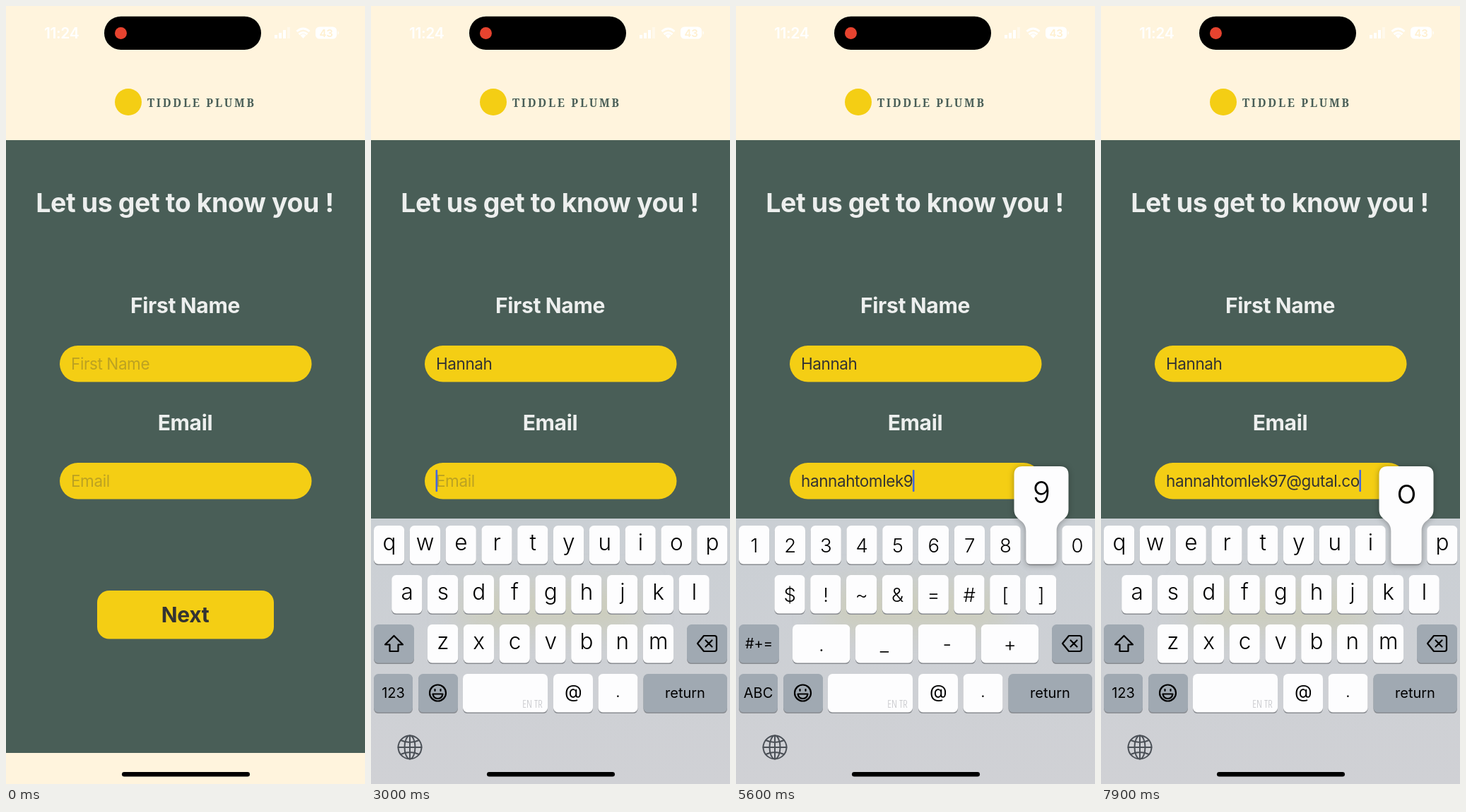
An HTML page for the animation above (8000 ms loop, 508 by 1102 pixels).

```html
<!DOCTYPE html>
<html lang="en">
<head>
<meta charset="utf-8">
<title>Sign-up form</title>
<style>
  html, body { margin: 0; height: 100%; overflow: hidden; background: #fff4dd; }
  svg { display: block; }
  #stage { width: 100vw; height: 100vh; }
  text { font-family: Inter, "Open Sans", sans-serif; letter-spacing: -.018em; }
  .mid { text-anchor: middle; }
  .bold { font-weight: 700; fill: #edefee; letter-spacing: -.011em; }
  .input { font-size: 22.5px; fill: #333; }
  .hint { font-size: 22.5px; fill: #3c3c43; fill-opacity: .3; }
  .lower { font-size: 31.5px; font-weight: 300; }
  .upper { font-size: 27.5px; font-weight: 350; }
  .small { font-size: 20px; letter-spacing: 0; }
  .at { font-size: 25.5px; }
  .lang { font: 300 15px "Open Sans", sans-serif; font-stretch: 75%; letter-spacing: 0; fill: #bbbcc0; text-anchor: end; }
  .line { fill: none; stroke: #000; stroke-width: 2.2; stroke-linecap: round; stroke-linejoin: round; }
  .gray { stroke: #4b5057; stroke-width: 2; }
  #popup { filter: drop-shadow(0 1px 4px #0005); }
  #popup text { font-weight: 300; }
</style>
</head>
<body>
<svg id="stage" viewBox="0 0 508 1102">
  <defs>
    <linearGradient id="board" x2="0" y2="1">
      <stop stop-color="#cacfd4"/><stop offset="1" stop-color="#d0d1d5"/>
    </linearGradient>
    <filter id="soft" x="-50%" y="-150%" width="200%" height="400%"><feGaussianBlur stdDeviation="24"/></filter>
  </defs>

  <rect width="508" height="1102" fill="#fff4dd"/>
  <rect y="190" width="508" height="868" fill="#495e57"/>

  <g fill="#fff">
    <text x="54" y="45.5" font-size="21" font-weight="600">11:24</text>
    <path d="M380 41h4v5h-4zM386 38h4v8h-4zM392 34h4v12h-4z"/>
    <path d="M398 30h4v16h-4z" opacity=".4"/>
    <path d="M420.5 46l-4-4.5q4-3.5 8 0z"/>
    <path d="M411.5 36q9-8 18 0M414.5 40q6-5 12 0" fill="none" stroke="#fff" stroke-width="3"/>
    <rect x="438" y="29.5" width="30" height="17" rx="5.5"/>
    <path d="M469.5 35q2.5 3 0 6z"/>
    <text class="mid" x="453" y="43.5" font-size="15" font-weight="600" fill="#fff0d0">43</text>
  </g>
  <rect x="139" y="14.7" width="222" height="47.3" rx="23.6"/>
  <circle cx="162.5" cy="38.5" r="8.5" fill="#e6432f"/>

  <circle cx="173" cy="136" r="19" fill="#f4ce14"/>
  <text x="200" y="143" style="font:700 15.5px 'Noto Serif',serif;letter-spacing:2.7px" fill="#495e57">TIDDLE PLUMB</text>

  <text class="mid bold" x="253" y="292" font-size="37.5">Let us get to know you !</text>
  <text class="mid bold" x="253.5" y="435" font-size="30">First Name</text>
  <text class="mid bold" x="253.5" y="601" font-size="30">Email</text>
  <g fill="#f4ce14">
    <rect x="76" y="481" width="356.5" height="51.5" rx="25.75"/>
    <rect x="76" y="647" width="356.5" height="51.5" rx="25.75"/>
    <rect x="129" y="828" width="250" height="68.5" rx="17"/>
  </g>
  <text class="mid bold" x="253.5" y="873" font-size="30" style="fill:#333">Next</text>
  <text class="hint" x="92" y="515">First Name</text>
  <text class="hint" x="92" y="681">Email</text>
  <text class="input" x="92" y="515"></text>
  <text class="input" x="92" y="681"></text>
  <g id="clear">
    <circle cx="409" cy="673" r="11.5" fill="#b89d22"/>
    <path d="M405 669l8 8m0-8l-8 8" class="line" style="stroke:#f4ce14"/>
  </g>
  <rect id="caret" width="2.6" height="31" rx="1" fill="#4468e0"/>

  <g id="keyboard">
    <svg y="726" width="508" height="376">
      <rect width="508" height="376" fill="url(#board)"/>
      <rect id="glow" x="129" width="250" height="50" fill="#cdca9c" opacity=".55" filter="url(#soft)"/>
    </svg>
    <g id="keys"></g>
    <g class="line gray">
      <circle cx="55" cy="1050" r="16.5"/>
      <ellipse cx="55" cy="1050" rx="7.5" ry="16.5"/>
      <path d="M55 1033.5v33M38.5 1050h33M42 1040q13 6 26 0M42 1060q13-6 26 0"/>
    </g>
    <g id="mic" class="line gray">
      <rect x="447.5" y="1032" width="11" height="23" rx="5.5"/>
      <path d="M441.5 1047v2.5a11.5 11.5 0 0 0 23 0V1047M453 1061v6M446.5 1067h13"/>
    </g>
    <g id="popup"><path fill="#fdfdfe"/><text class="mid" y="-32"></text></g>
  </g>
  <rect x="164" y="1085" width="181" height="6.5" rx="3.25"/>
</svg>
<script>
const LOOP = 8000, OPEN = 778, EMAIL = 2800, NUM_ON = 5200, NUM_OFF = 6300;
const $ = s => document.querySelector(s);
const PITCH = 50.8, KEY_W = 43.2, KEY_H = 54.5, ROWS = [736, 806, 876, 946];
const WHITE = '#fdfdfe', DARK = '#a0a9b2';
const spots = {};

const label = (x, y, cls, s) => `<text class="mid ${cls}" x="${x}" y="${y}">${s.replace('&', '&amp;')}</text>`;
const cap = (x, row, w, fill = WHITE) => [1.6, 0].map((dy, i) =>
  `<rect x="${x}" y="${ROWS[row] + dy}" width="${w}" height="${KEY_H}" rx="6.5" fill="${i ? fill : '#898c91'}"/>`).join('');

function charKey(c, x, row, w = KEY_W) {
  spots[c] = { x: x + w / 2, y: ROWS[row], half: w / 2 };
  const lower = /[a-z]/.test(c);
  return cap(x, row, w) + label(x + w / 2, ROWS[row] + (lower ? 35 : 38), lower ? 'lower' : 'upper', c);
}
const keyRow = (chars, x, row, w = KEY_W, step = PITCH) =>
  [...chars].map((c, i) => charKey(c, x + i * step, row, w)).join('');

const shiftKey = on => cap(4, 2, 57, on ? WHITE : DARK) +
  `<path class="line" d="M32.5 892l12.5 12.5h-6.5v9.5h-12v-9.5h-6.5z" ${on ? 'style="fill:#000"' : ''}/>`;

function bottomRow(email, mode) {
  const end = email ? 250 : 378;
  return cap(4, 3, 55, DARK) + label(31.5, 980, 'small', mode) +
    cap(67, 3, 56, DARK) +
    `<g class="line"><circle cx="94.5" cy="973" r="11.5"/><path d="M90.5 968v2m8-2v2"/>
     <path d="M87.5 974.5h14q-1 6.5-7 6.5t-7-6.5z"/></g>` +
    cap(130, 3, end - 130) + `<text class="lang" x="${end - 7.5}" y="994">EN TR</text>` +
    (email ? cap(258, 3, 56) + label(286, 980, 'at', '@') +
      cap(321.5, 3, 56) + label(349.5, 979, 'small', '.') : '') +
    cap(385.5, 3, 118.5, DARK) + label(444.5, 980, 'small', 'return');
}
const deleteKey = cap(447, 2, 57, DARK) +
  '<path class="line" d="M471 892h15q3 0 3 3v16q0 3-3 3h-15l-9-11zM473.5 898.5l9 9m0-9l-9 9"/>';

const letters = (up, email) => {
  const cased = s => up ? s.toUpperCase() : s;
  return keyRow(cased('qwertyuiop'), 4, 0) + keyRow(cased('asdfghjkl'), 29.2, 1) +
    shiftKey(up) + keyRow(cased('zxcvbnm'), 80, 2) + deleteKey + bottomRow(email, '123');
};
const layouts = {
  upper: letters(true, false),
  lower: letters(false, false),
  email: letters(false, true),
  digits: keyRow('1234567890', 4, 0) + keyRow('$!~&=#[]', 54.4, 1) +
    cap(4, 2, 57, DARK) + label(32.5, 910, 'small', '#+=') +
    keyRow('._-+', 80, 2, 81.4, 88.9) + deleteKey + bottomRow(true, 'ABC')
};
spots['@'] = { x: 286, y: ROWS[3], half: 28 };
spots['.'] = { x: 349.5, y: ROWS[3], half: 28 };

const keys = $('#keys');
keys.innerHTML = Object.entries(layouts).map(([name, svg]) => `<g id="${name}">${svg}</g>`).join('');

const typed = (text, times) => [...text].map((char, i) => ({ char, at: times[i] }));
const fields = [
  typed('Hannah', [1200, 1500, 1700, 1900, 2100, 2300]),
  typed('hannahtomlek97@gutal.co', [3200, 3400, 3700, 3850, 4000, 4150, 4300, 4400, 4500, 4600, 4700, 5000,
    5500, 5800, 6050, 6500, 6700, 6850, 7000, 7200, 7400, 7600, 7800])
];
const presses = fields.flat();
const inputs = document.querySelectorAll('.input'), hints = document.querySelectorAll('.hint');
const show = (el, on) => { el.style.display = on ? '' : 'none'; };

const balloon = h => `M${6 - h} 54.5Q${-h} 54.5 ${-h} 48.5V8C${-h}-10-38.5-6-38.5-23V-72` +
  `Q-38.5-84-26.5-84H26.5Q38.5-84 38.5-72V-23C38.5-6 ${h}-10 ${h} 8V48.5Q${h} 54.5 ${h - 6} 54.5Z`;

function drawPopup(t) {
  const press = presses.findLast(p => t >= p.at && t < p.at + 200), popup = $('#popup');
  show(popup, press);
  if (!press) return;
  const { x, y, half } = spots[press.char], [shape, text] = popup.children;
  popup.setAttribute('transform', `translate(${x} ${y})`);
  shape.setAttribute('d', balloon(half));
  text.textContent = press.char;
  text.setAttribute('font-size', /[a-z]/.test(press.char) ? 48 : 42);
}

function draw(t) {
  // Critically damped spring; the glow of the button behind stays put on the page
  const s = Math.max(0, t - OPEN) * .01826;
  const drop = 376 * (1 + s) * Math.exp(-s);
  $('#keyboard').setAttribute('transform', `translate(0 ${drop})`);
  $('#glow').setAttribute('y', 102 - drop);

  const layout = t < 1300 ? 'upper' : t < EMAIL ? 'lower' : t >= NUM_ON && t < NUM_OFF ? 'digits' : 'email';
  for (const g of keys.children) show(g, g.id === layout);
  show($('#mic'), t < EMAIL);

  fields.forEach((field, i) => {
    const text = field.filter(p => t >= p.at + 100).map(p => p.char).join('');
    inputs[i].textContent = text;
    show(hints[i], !text);
    if (i) show($('#clear'), text);
  });

  const active = t < EMAIL ? 0 : 1, caret = $('#caret');
  const last = Math.max(active ? EMAIL : OPEN, ...presses.map(p => p.at + 100).filter(at => at <= t));
  const idle = (t - last) % 1000;
  caret.setAttribute('x', 91.5 + (inputs[active].textContent ? inputs[active].getComputedTextLength() : 0));
  caret.setAttribute('y', active ? 657 : 491);
  caret.setAttribute('opacity', t < OPEN ? 0 : idle < 500 ? 1 : Math.min(1, Math.abs(idle - 750) / 250));

  drawPopup(t);
}

function tick(now) {
  draw(now % LOOP);
  requestAnimationFrame(tick);
}
requestAnimationFrame(tick);
</script>
</body>
</html>
```
